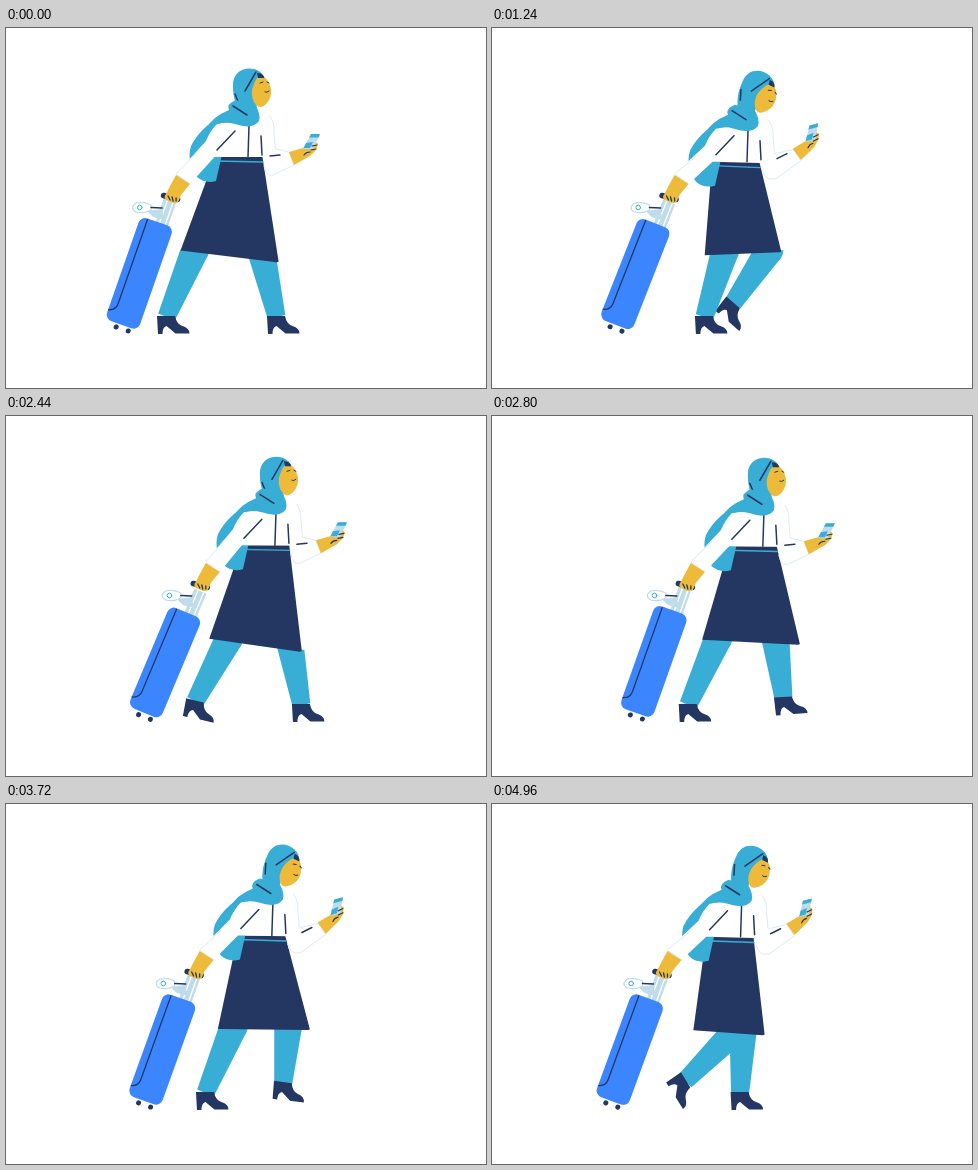
An HTML page with a canvas that plays this animation: 480 by 360 pixels, repeating every 5000 ms.

```html
<!DOCTYPE html>
<html lang="en">
<head>
<meta charset="utf-8">
<title>Traveller</title>
<style>
html, body { margin: 0; width: 100%; height: 100%; overflow: hidden; background: #fff; }
canvas { display: block; }
</style>
</head>
<body>
<canvas id="stage" width="480" height="360"></canvas>
<script>
const ctx = document.getElementById('stage').getContext('2d');
const { PI, sin, cos, atan, floor, hypot } = Math;
const LOOP = 5000, STEP = 480, TICK = 40;
const BLUE = '#38aed7', NAVY = '#243763', SKIN = '#edbb39', CASE = '#3b86ff',
      PALE = '#bfdceb', EDGE = '#dcecf4', WHITE = '#fff';

const fill = (d, color) => { ctx.fillStyle = color; ctx.fill(new Path2D(d)); };
const line = (d, color = NAVY, width = 1.5) => {
  ctx.strokeStyle = color;
  ctx.lineWidth = width;
  ctx.stroke(new Path2D(d));
};
const dot = (x, y, r, color) => {
  ctx.fillStyle = color;
  ctx.beginPath();
  ctx.arc(x, y, r, 0, 2 * PI);
  ctx.fill();
};
const group = (x, y, angle, draw) => {
  ctx.save();
  ctx.translate(x, y);
  ctx.rotate(angle);
  draw();
  ctx.restore();
};
const smooth = (a, b, v) => {
  const k = Math.min(1, Math.max(0, (v - a) / (b - a)));
  return k * k * (3 - 2 * k);
};

function suitcase(base, top) {
  group(base, 296, atan((top - base) / 100), () => {
    fill('M-2-133H11V-100H-2Z', PALE);
    line('M2-132V-106M8-132V-106', WHITE, 1.4);
    dot(-4.7, 4.8, 2.5, NAVY);
    dot(8, 4.6, 2.5, NAVY);
    ctx.fillStyle = CASE;
    ctx.beginPath();
    ctx.roundRect(-18, -108, 35, 109, 7);
    ctx.fill();
    line('M-10.5-107V-18q0 7-7 9', NAVY, 1.3);
  });
  group(top - 151, 0, 0, () => {
    fill('M141 183L156 181L158 192L147 189Z', PALE);
    const tag = 'M130 175Q138 173 145 177V182Q138 186 130 184Q123 180 130 175Z';
    fill(tag, WHITE);
    line(tag, PALE, 1.2);
    line('M136 179.5a2.3 2.3 0 1 1-4.6 0a2.3 2.3 0 1 1 4.6 0', BLUE, 1);
    line('M145 179.5L156 180');
  });
}

// u runs 0..2: planted for the first half, swinging for the second
function leg(u) {
  const c = cos(PI * u), s = sin(PI * u), wave = sin(2 * PI * u);
  const swing = Math.max(0, -s);
  const kx = 222 + 33 * c + (swing ? 42 * s * s + 7 * wave : 9 * s), ky = 222;
  const ax = 215.5 + 55 * c, ay = 289 - 14 * swing;
  const tilt = swing ? (55 * s * s + 20 * wave) * PI / 180 : 0;
  const len = hypot(ax - kx, ay - ky), nx = (ay - ky) / len, ny = (kx - ax) / len;
  dot(kx, ky, 14, BLUE);
  fill(`M${kx - 14 * nx} ${ky - 14 * ny}L${kx + 14 * nx} ${ky + 14 * ny}
    L${ax + 9 * nx} ${ay + 9 * ny}L${ax - 9 * nx} ${ay - 9 * ny}Z`, BLUE);
  group(ax, ay, tilt, () =>
    fill('M-9.500-1L8.500-1Q10 7 16 9Q23 11 23 16.500H9L0 9Q-4 10-4 17H-8.500Z', NAVY));
}

function lowerBody(q, bob) {
  const p = q % 1, lift = bob / 5, y = 129 + bob;
  const lx = 174.5 + 29 * lift, ly = 222.5 + bob;
  const rx = 273.5 - 7.5 * sin(2 * PI * (p + .02)), ry = 229 + 6 * cos(2 * PI * (p - .12));
  // legs show only below the hem
  ctx.save();
  ctx.clip(new Path2D(`M0 ${ly - 1}H${lx}L${rx} ${ry - 1}H480V360H0Z`));
  leg((q + 1) % 2);
  leg(q % 2);
  ctx.restore();
  fill(`M209 ${y}L256.500 ${y + 1.5 * lift}L${rx} ${ry}Q${rx} ${ry + 1} ${rx - 2} ${ry + 1}
    L${lx} ${ly}Z`, NAVY);
  line(`M208.500 ${y + 4}L257 ${y + 5 + lift}`, BLUE, 1.3);
}

function head(tilt) {
  group(252, 77, tilt * .44, () => {
    ctx.translate(-252, -77);
    fill('M226 58C225 37 252 36 257 49L249 60L250 88L234 86C228 76 226 68 226 58Z', BLUE);
    fill('M252 48Q261 48 264 61Q265 69 260 75Q254 82 249 77Q244 71 245 62Q247 53 252 48Z', SKIN);
    fill('M250 45Q256 45 257.500 50L251 50Z', NAVY);
    line('M238 63L249 44M228 66L232 76');
    line('M253 55l3-1M260 54l2 1M258 64q2 1 4-1', NAVY, 1);
  });
}

function phoneHand(raise) {
  group(285 + 6.5 * raise, 131 - 9 * raise, -.26 * raise, () => {
    fill('M-3-7L11-11L23-18L26-15L24-9L18-3L2 6Z', SKIN);
    fill('M19-25H28L21-10H11Z', PALE);
    fill('M19-25H28L26.500-21.500H17ZM14-16L21-17L18-11H11.500Z', BLUE);
    line('M20-13l5-1M19-9l5-1M12-4q2-3 6-3', NAVY, 1.2);
  });
}

function gripHand(x) {
  group(x, 0, 0, () => {
    line('M157.500 167.500L171.500 171.500', NAVY, 5.5);
    fill('M170 147L184 156L175 167L172 174Q168 176 165 174L160 172Q157 169 160 166L164 158Z', SKIN);
    line('M162 168l2 4M166 169l1 4M170 170l0 3', NAVY, 1.3);
  });
}

function upperBody(tilt, raise, bob, handX) {
  const torsoX = 1 + .4 * bob;
  const torso = draw => group(torsoX, bob, 0, draw);
  const wx = handX - torsoX, wy = -bob;
  torso(() => {
    fill('M226 82C206 90 191 104 184 118C180 130 185 142 190 149Q198 156 209 153L216 122L252 95Z', BLUE);
    fill('M210 96L254 88Q266 86 267 96L269 122L256 129H207Z', WHITE);
    line('M263 88Q268 96 267 104L268.500 122', EDGE, 1);
    fill(`M210 96Q203 103 199 113L${170 + wx} ${146 + wy}L${184 + wx} ${156 + wy}L212 124L228 100Z`, WHITE);
    line(`M190 124L${170 + wx} ${146 + wy}L${184 + wx} ${156 + wy}`, EDGE, 1);
  });
  gripHand(handX);
  torso(() => {
    const sleeve = `M269 121L${282 + 5.5 * raise} ${124 - 7 * raise}L${287 + 8 * raise} ${137 - 9 * raise}
      L${266 + 4 * raise} ${147 - raise}Q259 149 257 138`;
    fill(sleeve + 'L256 118Z', WHITE);
    line(sleeve, EDGE, 1);
    line(`M228 103L210 122M242 98L241 129M254 108L255 127
      M${263 + 8 * raise} ${128 - 2 * raise}l10 ${-1 - 4 * raise}`);
    phoneHand(raise);
    head(tilt);
    fill('M229 72Q219 76 222 82Q205 89 200 100Q214 92 228 96Q246 102 252 93Q254 87 249 78Z', BLUE);
    line('M226 78L240 87');
  });
}

function draw(t) {
  const q = t / STEP;
  const drift = 14.2 * (1 - cos(PI * q / 6));
  const bob = 5 * sin(PI * q) ** 2;
  const s = t % (6 * STEP);
  const lower = smooth(2080, 2440, s);
  const base = 114 + 2.2 * cos(PI * (q + .05));
  const top = 152.5 - 1.5 * cos(PI * (q - .1));

  ctx.fillStyle = WHITE;
  ctx.fillRect(0, 0, 480, 360);
  ctx.lineCap = ctx.lineJoin = 'round';
  group(drift, 0, 0, () => {
    suitcase(base, top);
    lowerBody(q, bob);
    upperBody(smooth(160, 600, s) - lower, smooth(260, 640, s) - lower, bob, top - 151);
  });
}

function tick() {
  draw(floor(performance.now() % LOOP / TICK) * TICK);
  requestAnimationFrame(tick);
}
tick();
</script>
</body>
</html>
```
